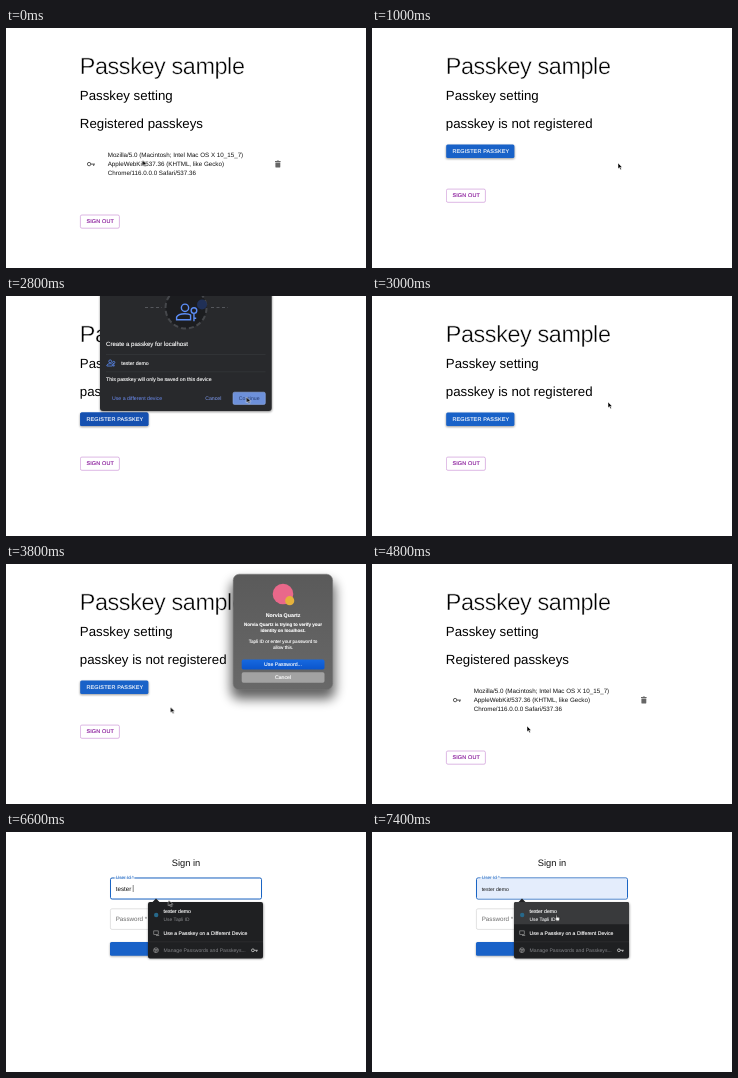
An HTML page that plays this animation: 360x240 px, repeating every 8 s.

```html
<!DOCTYPE html>
<html lang="en">
<head>
<meta charset="utf-8">
<title>Passkey sample</title>
<style>
html, body { margin: 0; width: 100%; height: 100%; overflow: hidden; background: #fff; }
svg { display: block; width: 360px; height: 240px; }
text { font-family: "Liberation Sans", Arial, sans-serif; font-size: 6.24px; fill: #111; white-space: pre; text-rendering: geometricPrecision; }
.mid { text-anchor: middle; }
.h2 { font-size: 23.4px; letter-spacing: -.39px; fill: #000; stroke: #fff; stroke-width: .45px; }
.h4 { font-size: 13.28px; fill: #000; }
.h5 { font-size: 9.3px; }
.btn { font-size: 5.46px; letter-spacing: .155px; stroke-width: .15px; }
.purple { fill: #8a1c9c; stroke: #8a1c9c; }
.white, .white text { fill: #fff; stroke: #fff; stroke-width: .12px; }
.small text { font-size: 5.2px; }
.strong { font-weight: 700; }
.label { font-size: 4.68px; fill: #1a65c4; }
.hint { fill: #6b6b6b; }

/* Every change is a hard cut on a 200 ms grid (2.5% of the loop). */
.on { animation: 8s step-end infinite; }
.home { animation-name: home; }
.list { animation-name: list; }
.empty { animation-name: empty; }
.over { animation-name: over; }
.create { animation-name: create; }
.verify { animation-name: verify; }
.login { animation-name: login; }
.idle { animation-name: idle; }
.focus { animation-name: focus; }
.typed { animation-name: typed; }
.pick { animation-name: pick; }
.move { animation-name: move; }
.arrow { animation-name: arrow; }
.hand { animation-name: hand; }
@keyframes home { 0% { opacity: 1 } 67.5%, to { opacity: 0 } }
@keyframes list { 0%, 57.5% { opacity: 1 } 12.5%, 67.5%, to { opacity: 0 } }
@keyframes empty { 0%, 57.5%, to { opacity: 0 } 12.5% { opacity: 1 } }
@keyframes over { 0%, 37.5%, to { opacity: 0 } 20% { opacity: 1 } }
@keyframes create { 0%, 37.5%, to { opacity: 0 } 27.5% { opacity: .6 } 30% { opacity: 1 } }
@keyframes verify { 0%, 55%, to { opacity: 0 } 42.5% { opacity: 1 } }
@keyframes login { 0% { opacity: 0 } 67.5%, to { opacity: 1 } }
@keyframes idle { 0% { opacity: 1 } 80%, to { opacity: 0 } }
@keyframes focus { 0% { opacity: 0 } 80%, to { opacity: 1 } }
@keyframes typed { 0%, 92.5%, to { opacity: 0 } 82.5% { opacity: 1 } }
@keyframes pick { 0% { opacity: 0 } 92.5%, to { opacity: 1 } }
@keyframes hand { 0%, 12.5%, 27.5%, 67.5%, to { opacity: 0 } 7.5%, 20%, 65%, 92.5% { opacity: 1 } }
@keyframes arrow { 0%, 12.5%, 27.5%, 67.5% { opacity: 1 } 7.5%, 20%, 65%, 92.5%, to { opacity: 0 } }
@keyframes move {
  0% { transform: translate(136.5px, 132px) }
  2.5% { transform: translate(178px, 133px) }
  5% { transform: translate(236px, 135px) }
  7.5% { transform: translate(270px, 136px) }
  12.5% { transform: translate(246px, 135px) }
  15% { transform: translate(196px, 132px) }
  17.5% { transform: translate(148px, 127px) }
  20% { transform: translate(115px, 122px) }
  22.5% { transform: translate(104.5px, 121px) }
  27.5% { transform: translate(112px, 120px) }
  30% { transform: translate(176px, 112px) }
  32.5% { transform: translate(230px, 104px) }
  35% { transform: translate(240.5px, 101px) }
  37.5% { transform: translate(236px, 106px) }
  40% { transform: translate(212px, 123px) }
  42.5% { transform: translate(184px, 138px) }
  45% { transform: translate(168px, 143px) }
  47.5% { transform: translate(164.5px, 143px) }
  52.5% { transform: translate(162px, 149px) }
  57.5% { transform: translate(157px, 158px) }
  60% { transform: translate(155px, 162px) }
  62.5% { transform: translate(126px, 178px) }
  65% { transform: translate(103px, 189px) }
  70% { transform: translate(101px, 188px) }
  77.5% { transform: translate(142px, 100px) }
  80% { transform: translate(160px, 66px) }
  82.5% { transform: translate(162.5px, 68px) }
  87.5% { transform: translate(164px, 68px) }
  90% { transform: translate(170px, 67px) }
  92.5%, to { transform: translate(183px, 82.5px) }
}
</style>
</head>
<body>
<svg viewBox="0 0 360 240">
  <defs>
    <filter id="soft" x="-30%" y="-30%" width="160%" height="160%"><feGaussianBlur stdDeviation="6"/></filter>
    <filter id="near" x="-10%" y="-40%" width="120%" height="180%"><feGaussianBlur stdDeviation="1"/></filter>
    <linearGradient id="panel" x1="0" y1="0" x2="0" y2="1">
      <stop offset="0" stop-color="#5a5a5a"/><stop offset="1" stop-color="#686868"/>
    </linearGradient>
    <linearGradient id="blue" x1="0" y1="0" x2="0" y2="1">
      <stop offset="0" stop-color="#1769e0"/><stop offset="1" stop-color="#0a55cc"/>
    </linearGradient>
    <g id="out">
      <rect x="74.4" y=".4" width="39" height="13.2" rx="1.5" fill="#fff" stroke="#c689d2" stroke-width=".6"/>
      <text class="btn purple" x="80.4" y="8.8">SIGN OUT</text>
    </g>
    <g id="key" fill="none" stroke="currentColor">
      <circle cx="2.3" cy="2.3" r="1.7"/>
      <path d="M4 2.3H8.2M6.9 2.3V4.2"/>
    </g>
    <g id="person" fill="none" stroke="#5c8df6">
      <circle cx="0" cy="-3" r="2.6"/>
      <path d="M-6 5.5V3.6Q-5 1.2 0 1.2Q3 1.2 4 2.2V5.5Z"/>
      <circle cx="6.4" cy="-1" r="2"/>
      <path d="M6.4 1V6.6M6.4 4.5H8"/>
    </g>
  </defs>

  <g class="on home">
    <text class="h2" x="73.7" y="46">Passkey sample</text>
    <text class="h4" x="73.8" y="72">Passkey setting</text>
  </g>

  <g class="on list">
    <text class="h4" x="73.8" y="100.2">Registered passkeys</text>
    <use href="#key" x="80.8" y="133.8" color="#555"/>
    <text x="101.7" y="129.2">Mozilla/5.0 (Macintosh; Intel Mac OS X 10_15_7)</text>
    <text x="101.7" y="138.3">AppleWebKit/537.36 (KHTML, like Gecko)</text>
    <text x="101.7" y="147.4">Chrome/116.0.0.0 Safari/537.36</text>
    <path d="M269 133H270.6L271.1 132.5H272.6L273.1 133H274.6V133.9H269ZM269.4 134.4H274.3V138.7Q274.3 139.6 273.4 139.6H270.3Q269.4 139.6 269.4 138.7Z" fill="#666"/>
    <use href="#out" y="186.6"/>
  </g>

  <g class="on empty">
    <text class="h4" x="73.8" y="100.2">passkey is not registered</text>
    <rect x="74" y="117.5" width="68.5" height="13.5" rx="1.5" opacity=".4" filter="url(#near)"/>
    <rect x="74.2" y="116.4" width="68.2" height="13.7" rx="1.5" fill="#1962c8"/>
    <rect class="on over" x="74.2" y="116.4" width="68.2" height="13.7" rx="1.5" fill="#1550b0"/>
    <text class="btn white" x="80.4" y="125.2">REGISTER PASSKEY</text>
    <use href="#out" y="160.7"/>
  </g>

  <g class="on create small">
    <rect x="94" y="-8" width="172" height="124" rx="3" opacity=".45" filter="url(#near)"/>
    <path d="M94 0H265.7V112Q265.7 115 262.7 115H97Q94 115 94 112Z" fill="#28292c"/>
    <circle cx="180" cy="12" r="20.5" fill="#1c1d20" stroke="#45474b" stroke-width="2" stroke-dasharray="5 3"/>
    <path d="M139 11.5H156M205 11.5H222" stroke="#55575c" stroke-width="1.2" stroke-dasharray="3 2.5"/>
    <circle cx="196" cy="8.5" r="5" fill="#203057"/>
    <use href="#person" transform="translate(179 16) scale(1.4)"/>
    <text class="white" x="100" y="50.3" style="font-size:6.1px">Create a passkey for localhost</text>
    <path d="M100 58.5H259.5M100 75.8H259.5" stroke="#3b3d41" stroke-width=".5"/>
    <use href="#person" transform="translate(104.2 67) scale(.55)" stroke-width="1.4"/>
    <g class="white">
      <text x="115.3" y="68.8">tester demo</text>
      <text x="100" y="85.3">This passkey will only be saved on this device</text>
    </g>
    <text x="106" y="104" style="fill:#6c8df4">Use a different device</text>
    <text class="mid" x="207.3" y="104" style="fill:#7f9df5">Cancel</text>
    <rect x="227" y="96.2" width="32.3" height="12.2" rx="1.5" fill="#6d90da" stroke="#8fabe6" stroke-width=".6"/>
    <text class="mid" x="243.2" y="104" style="fill:#263c70">Continue</text>
  </g>

  <g class="on verify small">
    <rect x="225" y="17" width="104" height="118" rx="8" opacity=".62" filter="url(#soft)"/>
    <rect x="227.2" y="10.2" width="99.4" height="115.4" rx="6" fill="url(#panel)" stroke="#777" stroke-width=".5"/>
    <circle cx="277" cy="30" r="10.3" fill="#e9688a"/>
    <circle cx="283.7" cy="36.7" r="4.6" fill="#e5b23c"/>
    <g class="white mid">
      <text class="strong" x="277" y="53" style="font-size:5.3px">Norvia Quartz</text>
      <g class="strong">
        <text x="277" y="62.3" style="font-size:4.5px">Norvia Quartz is trying to verify your</text>
        <text x="277" y="68" style="font-size:4.5px">identity on localhost.</text>
      </g>
      <text x="277" y="79.2" style="font-size:4.6px">Tapli ID or enter your password to</text>
      <text x="277" y="84.7" style="font-size:4.6px">allow this.</text>
    </g>
    <rect x="235.7" y="95.4" width="82.8" height="10.2" rx="1.8" fill="url(#blue)"/>
    <rect x="235.7" y="108.3" width="82.8" height="10.4" rx="1.8" fill="#a2a2a2"/>
    <text class="white mid" x="277" y="102.2">Use Password...</text>
    <text class="white mid" x="277" y="115.2">Cancel</text>
  </g>

  <g class="on login">
    <text class="h5 mid" x="180" y="33.7">Sign in</text>
    <rect x="104.4" y="46" width="151.2" height="21" rx="1.6" fill="#fff" stroke="#c4c4c4" stroke-width=".5"/>
    <text class="on idle hint" x="109.7" y="58.8">User Id *</text>
    <rect x="104.4" y="76.8" width="151.2" height="20.6" rx="1.6" fill="#fff" stroke="#c4c4c4" stroke-width=".5"/>
    <text class="hint" x="109.7" y="89.2">Password *</text>
    <rect x="104" y="111" width="152" height="13.4" rx="1.5" opacity=".35" filter="url(#near)"/>
    <rect x="104" y="110" width="152" height="13.8" rx="1.5" fill="#1962c8"/>
    <text class="btn white mid" x="180" y="118.9">SIGN IN</text>

    <g class="on focus">
      <rect x="104.5" y="46" width="151" height="21" rx="1.6" fill="#fff" stroke="#1a65c4"/>
      <rect class="on pick" x="105" y="46.5" width="150" height="20" rx="1.2" fill="#e4edfc"/>
      <path d="M108.5 46H128.5" stroke="#fff" stroke-width="1.4"/>
      <text class="label" x="109.8" y="47.4">User Id *</text>
      <g class="on typed">
        <text x="109.7" y="58.8">tester</text>
        <path d="M127.2 53V60" stroke="#111" stroke-width=".5"/>
      </g>
      <text class="on pick" x="109.7" y="58.8" style="font-size:5.15px">tester demo</text>

      <g class="small">
        <rect x="142" y="71" width="115.5" height="56" rx="2" opacity=".4" filter="url(#near)"/>
        <path d="M144 70H146.5L150 66.5L153.5 70H255Q257 70 257 72V124.5Q257 126.5 255 126.5H144Q142 126.5 142 124.5V72Q142 70 144 70Z" fill="#1f2022"/>
        <path class="on pick" d="M142 92.3V72Q142 70 144 70H255Q257 70 257 72V92.3Z" fill="#393a3c"/>
        <path d="M142 109.8H257" stroke="#333437" stroke-width=".6"/>
        <circle cx="150.2" cy="83" r="2.2" fill="#27688a"/>
        <rect x="147.8" y="98.9" width="4.4" height="3.6" fill="none" stroke="#aaa" stroke-width=".6"/>
        <path d="M150 103.4H153.2" stroke="#aaa" stroke-width=".7"/>
        <g fill="none" stroke="#aaa" stroke-width=".6">
          <circle cx="150" cy="118.2" r="2.4"/><circle cx="150" cy="118.2" r=".9"/>
          <path d="M149.2 117.8L148 116.9M150.8 117.8H152.2M150 119.1L149.2 120.4"/>
        </g>
        <g class="white">
          <text x="157.6" y="81">tester demo</text>
          <text x="157.6" y="103" style="font-size:5.16px">Use a Passkey on a Different Device</text>
        </g>
        <text x="157.6" y="89" style="font-size:4.85px;fill:#8b8c8f">Use Tapli ID</text>
        <text class="on pick" x="157.6" y="89" style="font-size:4.85px;fill:#e6e6e6">Use Tapli ID</text>
        <text x="157.6" y="120.2" style="font-size:5.1px;fill:#85868a">Manage Passwords and Passkeys...</text>
        <use href="#key" transform="translate(245 116.4) scale(.82)" color="#d0d0d0"/>
      </g>
    </g>
  </g>

  <g class="on move">
    <path class="on arrow" d="M0 0V5.8L1.4 4.6L2.4 6.8L3.4 6.3L2.5 4.2H4.2Z" fill="#000" stroke="#fff" stroke-width=".5"/>
    <path class="on hand" d="M1 .6Q1.5 -.2 2 .6V2.5L4.2 3Q4.9 3.3 4.8 4.2L4.2 6.4H1.6L-.1 4.2Q-.3 3.3 1 3.8Z" fill="#fff" stroke="#111" stroke-width=".6"/>
  </g>
</svg>
</body>
</html>
```
